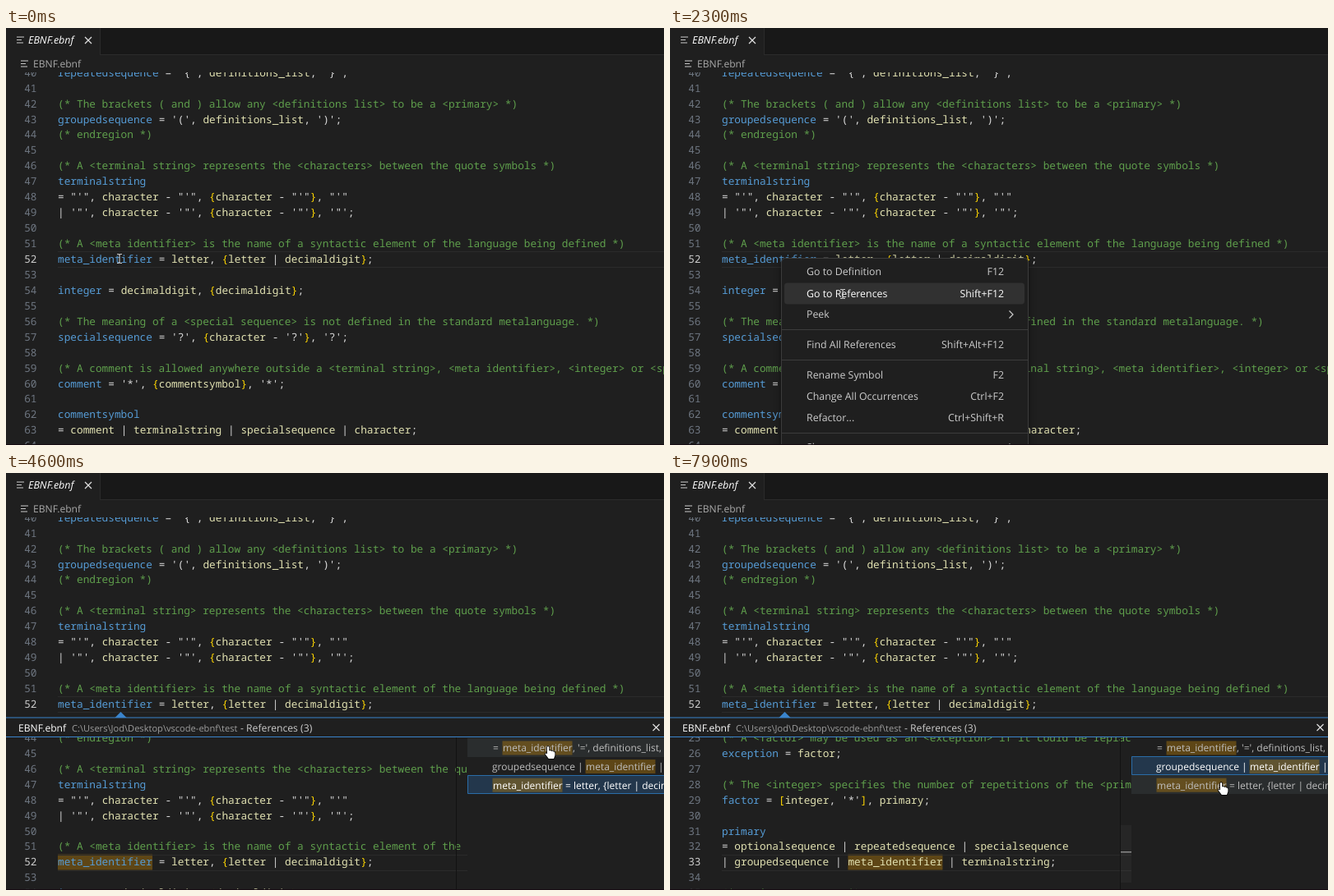
These frames come from a looping animation (800x508 px, 8 s). An HTML page with a canvas:

```html
<!DOCTYPE html>
<html lang="en">
<head>
<meta charset="utf-8">
<title>EBNF references</title>
<style>
html, body { margin: 0; width: 100%; height: 100%; overflow: hidden; background: #1f1f1f; }
canvas { display: block; width: 800px; height: 508px; }
</style>
</head>
<body>
<canvas width="800" height="508"></canvas>
<script>
const ctx = document.querySelector('canvas').getContext('2d');
const LOOP = 8000, LINE = 18.94, CHAR = 7.67, LEFT = 63;
const MENU_OPEN = 800, PEEK_OPEN = 2400, PICK_FIRST = 5000, PICK_SECOND = 6800;
const CODE_FONT = '500 12.783px "Noto Sans Mono", monospace';
const ui = (size, style = '') => `${style} ${size}px "Open Sans", sans-serif`;
const BG = '#1f1f1f', TEXT = '#cccccc', BLUE = '#569cd6', ACCENT = '#3a84cc';
const MATCH = 'rgba(187,128,9,.4)';

const block = (first, text) => ({ first, lines: text.split('\n') });

const mainCode = block(40, `repeatedsequence = '{', definitions_list, '}';

(* The brackets ( and ) allow any <definitions list> to be a <primary> *)
groupedsequence = '(', definitions_list, ')';
(* endregion *)

(* A <terminal string> represents the <characters> between the quote symbols *)
terminalstring
= "'", character - "'", {character - "'"}, "'"
| '"', character - '"', {character - '"'}, '"';

(* A <meta identifier> is the name of a syntactic element of the language being defined *)
meta_identifier = letter, {letter | decimaldigit};

integer = decimaldigit, {decimaldigit};

(* The meaning of a <special sequence> is not defined in the standard metalanguage. *)
specialsequence = '?', {character - '?'}, '?';

(* A comment is allowed anywhere outside a <terminal string>, <meta identifier>, <integer> or <special sequence> *)
comment = '*', {commentsymbol}, '*';

commentsymbol
= comment | terminalstring | specialsequence | character;
`);

const headCode = block(5, `<letter>, <decimal digit> and <character> are not defined. The position is
stated in a comment but not formally defined.
*)

syntax = syntax_rule, {syntax_rule};

(* A <syntax rule> defines the sequences of symbols represented by a <meta identifier> *)
syntax_rule
= meta_identifier, '=', definitions_list, ';';

(* | separates the alternate single definitions *)`);

const primaryCode = block(25, `(* A <factor> may be used as an <exception> if it could be replaced by a <factor> *)
exception = factor;

(* The <integer> specifies the number of repetitions of the <primary> *)
factor = [integer, '*'], primary;

primary
= optionalsequence | repeatedsequence | specialsequence
| groupedsequence | meta_identifier | terminalstring;

(* region sequences *)`);

// Each reference: code to preview, its line, match column, and row text placed at x.
const references = [
  { code: headCode, line: 13, col: 2, matchX: 604, parts: [['=', 592], [", '=', definitions_list, ';'", 689]] },
  { code: primaryCode, line: 33, col: 20, matchX: 705, parts: [['groupedsequence |', 591], ['| terminalstring', 793]] },
  { code: mainCode, line: 52, col: 0, matchX: 592, parts: [['= letter, {letter | decimaldigit};', 680]] }
];

const menuItems = [
  ['Go to Definition', 'F12', 297], ['Go to References', 'Shift+F12', 323.5], ['Peek', '>', 349],
  ['Find All References', 'Shift+Alt+F12', 386], ['Rename Symbol', 'F2', 423],
  ['Change All Occurrences', 'Ctrl+F2', 449], ['Refactor...', 'Ctrl+Shift+R', 475], ['Share', '>', 511]
];

const mousePath = [
  [0, 138, 281], [1200, 138, 281], [1800, 210, 324], [2800, 210, 324], [3500, 441, 361],
  [3700, 441, 361], [4500, 659, 333], [5900, 659, 333], [6600, 672, 357], [7200, 672, 357],
  [7700, 670, 377], [LOOP, 670, 377]
];

const clamp = v => Math.max(0, Math.min(1, v));

function mouseAt(t) {
  const i = mousePath.findIndex(p => p[0] > t);
  const [t0, x0, y0] = mousePath[i - 1], [t1, x1, y1] = mousePath[i];
  const p = (t - t0) / (t1 - t0), e = p * p * (3 - 2 * p);
  return { x: x0 + (x1 - x0) * e, y: y0 + (y1 - y0) * e };
}

function rect(x, y, w, h, color) {
  ctx.fillStyle = color;
  ctx.fillRect(x, y, w, h);
}

function text(str, x, y, color, font, align = 'left') {
  ctx.font = font;
  ctx.fillStyle = color;
  ctx.textAlign = align;
  ctx.fillText(str, x, y + 4.4);
}

function stroke(d, color, width = 1) {
  ctx.strokeStyle = color;
  ctx.lineWidth = width;
  ctx.stroke(new Path2D(d));
}

function clipped(x, y, w, h, draw) {
  ctx.save();
  ctx.beginPath();
  ctx.rect(x, y, w, h);
  ctx.clip();
  draw();
  ctx.restore();
}

function codeLine(line, y, inComment) {
  if (inComment || line.startsWith('(*')) return text(line, LEFT, y, '#5f9f4c', CODE_FONT);
  for (const m of line.matchAll(/"[^"]*"|'[^']*'|\w+|[{}[\]]|[^\s\w]/g)) {
    const tok = m[0];
    const color = /^[a-z]/.test(tok) ? (m.index ? '#e2e2b2' : BLUE) : /^[{}[\]]/.test(tok) ? '#ffd700' : '#dcdcdc';
    text(tok, LEFT + m.index * CHAR, y, color, CODE_FONT);
  }
}

function codeBlock({ first, lines }, current, currentY) {
  const top = Math.round(currentY - 9.5) + .5;
  stroke(`M63 ${top}H800M63 ${top + 19}H800`, '#2b2b2b');
  lines.forEach((line, i) => {
    const n = first + i, y = currentY + (n - current) * LINE;
    if (y < 30 || y > 520) return;
    text(n, 37.5, y, n === current ? TEXT : '#6e7681', CODE_FONT, 'right');
    codeLine(line, y, n < 8);
  });
}

const fileIcon = (x, y) => stroke(`M${x} ${y - 3.5}h9M${x} ${y}h6M${x} ${y + 3.5}h8`, TEXT, 1.2);
const cross = (x, y) => stroke(`M${x - 4} ${y - 4}l8 8m0 -8l-8 8`, '#e0e0e0', 1.2);

function drawEditor() {
  rect(0, 0, 800, 508, BG);
  clipped(0, 54, 800, 454, () => codeBlock(mainCode, 52, 281.6));
  rect(115, 0, 685, 32, '#181818');
  rect(114, 0, 1, 32, '#2b2b2b');
  rect(114, 32, 686, 1, '#2b2b2b');
  fileIcon(13, 14.5);
  text('EBNF.ebnf', 27, 15, '#ffffff', ui(12.5, 'italic'));
  cross(100, 15);
  fileIcon(18, 43.5);
  text('EBNF.ebnf', 33, 44, '#a9a9a9', ui(12.1));
}

function drawMenu(mouse) {
  ctx.save();
  ctx.shadowColor = 'rgba(0,0,0,.5)';
  ctx.shadowBlur = 8;
  ctx.shadowOffsetY = 2;
  ctx.beginPath();
  ctx.roundRect(135.5, 280.5, 300, 260, 5);
  ctx.fillStyle = BG;
  ctx.fill();
  ctx.restore();
  ctx.strokeStyle = '#3c3c3c';
  ctx.lineWidth = 1;
  ctx.stroke();
  stroke('M136 367.5h299M136 404.5h299M136 493.5h299', '#3c3c3c');
  for (const [label, key, y] of menuItems) {
    const hot = mouse.y > 285 && Math.abs(mouse.y - y) < 13;
    if (hot) {
      ctx.beginPath();
      ctx.roundRect(139, y - 13, 292, 26, 4);
      ctx.fillStyle = '#313131';
      ctx.fill();
    }
    const color = hot ? '#ffffff' : TEXT;
    text(label, 166, y, color, ui(12.35));
    if (key === '>') stroke(`M412.5 ${y - 4.5}l4.5 4.5l-4.5 4.5`, color, 1.2);
    else text(key, 406, y, color, ui(12.35), 'right');
  }
}

function drawPreview({ code, line, col }, sinceClick) {
  clipped(0, 322, 561, 186, () => {
    rect(LEFT + col * CHAR, 464.5, 15 * CHAR, 19, MATCH);
    codeBlock(code, line, 474);
    rect(547, 322, 1, 186, '#121212');
    const markY = 374 + (line - 13) * 4.35;
    const alpha = sinceClick < 150 ? 0 : clamp((1250 - sinceClick) / 600);
    rect(548, markY - 32, 13, 70, `rgba(121,121,121,${alpha * .3})`);
    rect(548, markY, 13, 1.5, '#8a8a8a');
  });
}

function drawList(selected, mouse) {
  references.forEach(({ matchX, parts }, i) => {
    const y = 335 + i * 22.6, top = Math.round(y - 12.4);
    const isSelected = i === selected;
    if (isSelected) {
      rect(561, top, 239, 23, '#23374c');
      stroke(`M801 ${top + .5}H561.5v22H801`, '#2a6da8');
    } else if (mouse.x > 561 && Math.abs(mouse.y + 5 - y) < 11.3) {
      rect(561, top, 239, 23, '#2a2d2e');
    }
    const color = isSelected ? '#ffffff' : '#bdbdbd';
    rect(matchX - .5, y - 8.5, 85, 17, MATCH);
    text('meta_identifier', matchX, y, color, ui(12));
    for (const [str, x] of parts) text(str, x, y, color, ui(12));
  });
}

function drawPeek(t, mouse) {
  rect(0, 292, 800, 216, BG);
  ctx.fillStyle = ACCENT;
  ctx.fill(new Path2D('M132.5 298l7 -7l7 7z'));
  rect(0, 297.5, 800, 1, ACCENT);
  rect(0, 321, 800, 1, ACCENT);
  text('EBNF.ebnf', 15, 310.5, '#ffffff', ui(12.1));
  text('C:\\Users\\Jod\\Desktop\\vscode-ebnf\\test', 80, 310.5, '#9d9d9d', ui(11.1));
  text('- References (3)', 285, 310.5, TEXT, ui(12.2));
  cross(790.5, 310);
  const selected = t < PICK_FIRST ? 2 : t < PICK_SECOND ? 0 : 1;
  const clicked = [PICK_FIRST, PICK_SECOND, PEEK_OPEN][selected];
  drawPreview(references[selected], t - clicked);
  drawList(selected, mouse);
}

const cursors = {
  arrow: 'M0 0V12.5L3 9.8L5 14.2L7 13.3L5 9H9Z',
  hand: 'M-1 1Q0 -1 1.2 1V5.5Q3 4.4 4 6Q5.6 5 6.4 6.6Q8.2 6 8.4 8V11L7 15H.8L-3.4 9.6Q-3.6 7.6 -1 9Z'
};

function drawCursor(kind, { x, y }) {
  ctx.save();
  ctx.translate(x, y);
  if (kind === 'ibeam') {
    stroke('M-3 -5.5H-1L0 -4.5L1 -5.5H3M0 -4.5V4.5M-3 5.5H-1L0 4.5L1 5.5H3', '#c8c8c8', 1.1);
  } else {
    stroke(cursors[kind], '#000', 1.6);
    ctx.fillStyle = '#fff';
    ctx.fill(new Path2D(cursors[kind]));
  }
  ctx.restore();
}

function frame(now) {
  const t = now % LOOP, mouse = mouseAt(t);
  ctx.textRendering = 'geometricPrecision';
  drawEditor();
  if (t >= PEEK_OPEN) drawPeek(t, mouse);
  else if (t >= MENU_OPEN) drawMenu(mouse);
  rect(0, 507, 800, 1, '#150b12');
  const kind = mouse.x > 561 ? 'hand' : t >= MENU_OPEN && t < 2200 ? 'arrow' : 'ibeam';
  drawCursor(kind, mouse);
  requestAnimationFrame(frame);
}

requestAnimationFrame(frame);
</script>
</body>
</html>
```
